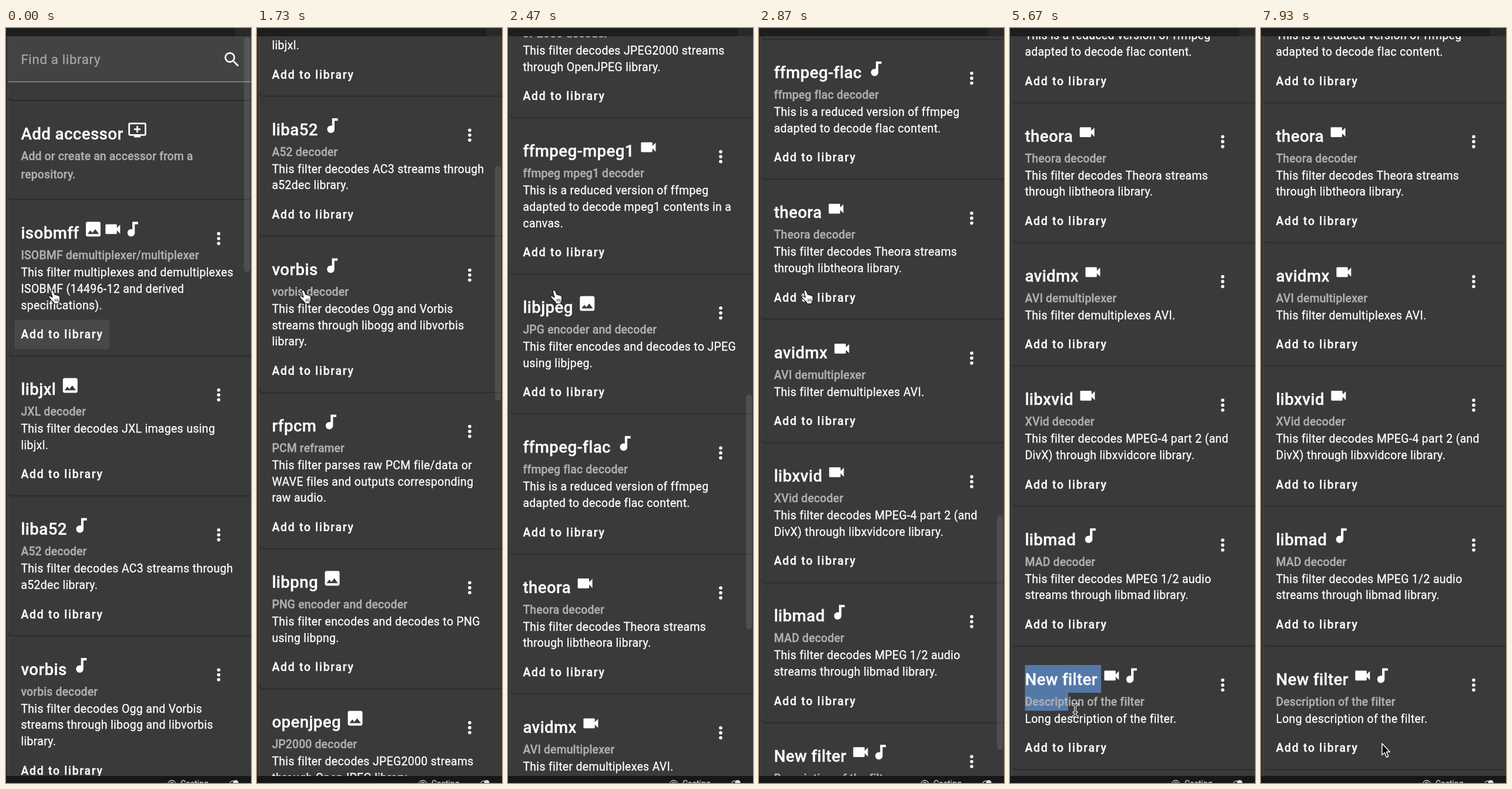
Animation of 417x1280 px, one loop 8 s. Source, as an HTML page:

```html
<!DOCTYPE html>
<html lang="en">
<head>
<meta charset="utf-8">
<title>Filter library</title>
<style>
html, body { margin: 0; width: 100%; height: 100%; overflow: hidden; background: #3a3a3a; }
svg { display: block; width: 100vw; height: 100vh; }
text { font-family: Roboto, "Liberation Sans", sans-serif; color: #fff; fill: currentColor; stroke: currentColor; stroke-width: .3px; white-space: pre; }
.title { font-size: 27.75px; font-weight: 500; letter-spacing: .0125em; }
.sub { font-size: 19.42px; font-weight: 500; letter-spacing: .00714em; color: #b0b0b0; }
.body { font-size: 19.42px; letter-spacing: .01786em; }
.button { font-size: 19.42px; font-weight: 500; letter-spacing: .0893em; }
.search { font-size: 22.2px; letter-spacing: .03125em; color: #a6a6a6; }
.status { font-size: 14px; color: #c4c4c4; }
</style>
</head>
<body>
<svg id="stage" viewBox="0 0 417 1280" preserveAspectRatio="none">
  <rect width="417" height="1280" fill="#3a3a3a"/>
  <g id="selection" fill="#5479a8"></g>
  <g id="list"></g>
  <rect id="thumb" x="405.5" width="9.5" height="397" rx="4.7" fill="#fff" fill-opacity=".1" stroke="#fff" stroke-opacity=".06"/>
  <rect y="14" width="3" height="1254" fill="#303030"/>
  <rect x="2.6" y="14" width="1.4" height="1254" fill="#484848"/>
  <rect width="417" height="14" fill="#1e1e1e"/>
  <rect x="390" width="27" height="14" fill="#292929"/>
  <rect y="1268" width="417" height="12" fill="#171717"/>
  <circle cx="282" cy="1282" r="6.5" fill="none" stroke="#c4c4c4" stroke-width="1.3"/>
  <circle cx="282" cy="1281.5" r="2.8" fill="none" stroke="#c4c4c4" stroke-width="1.3"/>
  <text class="status" x="297" y="1285.5">Casting</text>
  <circle cx="386" cy="1282" r="5.5" fill="none" stroke="#c4c4c4" stroke-width="1.3"/>
  <circle cx="391" cy="1279.5" r="4.6" fill="#dcdcdc"/>
  <g id="hand">
    <path d="M-1.8 1.7Q0-1.5 2.4 1L5.3 7.8Q7 6.8 8.1 8.5Q10 7.5 11 9.4Q13.2 8.8 13.5 11L13.8 15.8Q13.3 19 12 20.5V23H3.2V21L-1.6 16.2L-5.3 12Q-5.7 9.3-3 9.8L1 12.2Z" fill="#fff" stroke="#111" stroke-width="1.2" stroke-linejoin="round"/>
    <path d="M5.7 14.6V19.3M8.1 14.6V19.3M10.5 14.6V19.3" stroke="#222"/>
  </g>
  <g id="beam" fill="none" stroke-linecap="round">
    <path d="M-4-10Q0-10 0-7Q0-10 4-10M0-7V7M-4 10Q0 10 0 7Q0 10 4 10M-2.4 3H2.4" stroke="#fff" stroke-width="3.8"/>
    <path d="M-4-10Q0-10 0-7Q0-10 4-10M0-7V7M-4 10Q0 10 0 7Q0 10 4 10M-2.4 3H2.4" stroke="#181818" stroke-width="1.5"/>
  </g>
  <path id="arrow" d="M0 0V19.5L4.4 15.5L7.6 23.2L10.8 21.8L7.6 14.2H13.4Z" fill="#0a0a0a" stroke="#fff" stroke-width="1.5" stroke-linejoin="round"/>
</svg>
<script>
const $ = id => document.getElementById(id);
const SCALE = 1.3875, LEFT = 25.4, LINE = 20 * SCALE;
const STEP = 1000 / 15, LOOP = 8000;

const ICONS = {
  image: "M21 19V5c0-1.1-.9-2-2-2H5c-1.1 0-2 .9-2 2v14c0 1.1.9 2 2 2h14c1.1 0 2-.9 2-2zM8.5 13.5l2.5 3.01L14.5 12l4.5 6H5z",
  video: "M17 10.5V7c0-.55-.45-1-1-1H4c-.55 0-1 .45-1 1v10c0 .55.45 1 1 1h12c.55 0 1-.45 1-1v-3.5l4 4v-11z",
  note: "M12 3v9.28c-.47-.17-.97-.28-1.5-.28C8.01 12 6 14.01 6 16.5S8.01 21 10.5 21c2.31 0 4.2-1.75 4.45-4H15V6h4V3z",
  add: "M21 3H3c-1.1 0-2 .9-2 2v12c0 1.1.9 2 2 2h5v2h8v-2h5c1.1 0 2-.9 2-2V5c0-1.1-.9-2-2-2zm0 14H3V5h18zM11 15h2v-3h3v-2h-3V7h-2v3H8v2h3z",
  search: "M15.5 14h-.79l-.28-.27A6.47 6.47 0 0 0 16 9.5 6.5 6.5 0 1 0 9.5 16c1.61 0 3.09-.59 4.23-1.57l.27.28v.79l5 4.99L20.49 19zM9.5 14a4.5 4.5 0 1 1 0-9 4.5 4.5 0 0 1 0 9z"
};

// name | icons | subtitle | description lines
const FILTERS = [
  "isobmff|image video note|ISOBMF demultiplexer/multiplexer|This filter multiplexes and demultiplexes|ISOBMF (14496-12 and derived|specifications).",
  "libjxl|image|JXL decoder|This filter decodes JXL images using|libjxl.",
  "liba52|note|A52 decoder|This filter decodes AC3 streams through|a52dec library.",
  "vorbis|note|vorbis decoder|This filter decodes Ogg and Vorbis|streams through libogg and libvorbis|library.",
  "rfpcm|note|PCM reframer|This filter parses raw PCM file/data or|WAVE files and outputs corresponding|raw audio.",
  "libpng|image|PNG encoder and decoder|This filter encodes and decodes to PNG|using libpng.",
  "openjpeg|image|JP2000 decoder|This filter decodes JPEG2000 streams|through OpenJPEG library.",
  "ffmpeg-mpeg1|video|ffmpeg mpeg1 decoder|This is a reduced version of ffmpeg|adapted to decode mpeg1 contents in a|canvas.",
  "libjpeg|image|JPG encoder and decoder|This filter encodes and decodes to JPEG|using libjpeg.",
  "ffmpeg-flac|note|ffmpeg flac decoder|This is a reduced version of ffmpeg|adapted to decode flac content.",
  "theora|video|Theora decoder|This filter decodes Theora streams|through libtheora library.",
  "avidmx|video|AVI demultiplexer|This filter demultiplexes AVI.",
  "libxvid|video|XVid decoder|This filter decodes MPEG-4 part 2 (and|DivX) through libxvidcore library.",
  "libmad|note|MAD decoder|This filter decodes MPEG 1/2 audio|streams through libmad library.",
  "New filter|video note|Description of the filter|Long description of the filter."
];

function add(parent, tag, attrs, content) {
  const el = document.createElementNS("http://www.w3.org/2000/svg", tag);
  for (const key in attrs) el.setAttribute(key, attrs[key]);
  if (content) el.textContent = content;
  return parent.appendChild(el);
}

const list = $("list");
const label = (cls, y, content) => add(list, "text", { class: cls, x: LEFT, y }, content);
const icon = (name, x, y) => add(list, "path", {
  d: ICONS[name], fill: "#fff", "fill-rule": "evenodd",
  transform: `translate(${x} ${y}) scale(${SCALE})`
});

function edge(y) {
  const d = `M4 ${y - 6}q0 6 6 6H417`;
  add(list, "path", { d, fill: "none", stroke: "#000", "stroke-opacity": .07, "stroke-width": 4 });
  add(list, "path", { d, fill: "none", stroke: "#2c2c2c", "stroke-width": 1.4 });
}

function heading(top, name, icons) {
  const text = label("title", top + 66, name);
  const x = LEFT + text.getComputedTextLength() + 7.3;
  icons.split(" ").forEach((n, i) => icon(n, x + i * 24 * SCALE, top + 50 - 12 * SCALE));
}

function buildCard(top, [name, icons, sub, ...lines], focused) {
  const bottom = top + 131 * SCALE + lines.length * LINE;
  heading(top, name, icons);
  label("sub", top + 101, sub);
  lines.forEach((line, i) => label("body", top + 130 + i * LINE, line));
  if (focused) add(list, "rect", { x: 14.5, y: bottom - 61.5, width: 162, height: 50, rx: 5.5, fill: "#484848" });
  label("button", bottom - 30, "Add to library");
  for (const d of [-1, 0, 1]) add(list, "circle", { cx: 362, cy: top + 66 + d * 8.33, r: 2.8, fill: "#fff" });
  edge(bottom);
  return bottom;
}

function buildList() {
  add(list, "rect", { x: 4, y: 14, width: 413, height: 77, fill: "#434343" });
  add(list, "rect", { x: 4, y: 90.5, width: 413, height: 1.4, fill: "#929292" });
  label("search", 61, "Find a library");
  icon("search", 367.8, 36.8);
  edge(123);
  heading(123, "Add accessor", "add");
  label("sub", 224, "Add or create an accessor from a");
  label("sub", 254.5, "repository.");
  edge(291);
  FILTERS.reduce((top, row, i) => buildCard(top, row.split("|"), i === 0), 291);
}

// [step, offset]
const SCROLL = [[17, 0], [21, 300], [31, 1105.3], [37, 1883], [46, 2648]];
// [ms, x, y]
const POINTER = [
  [3666, 76, 496], [3733, 104, 820], [3800, 132, 1097], [3933, 132, 1097],
  [4400, 132, 1137], [4600, 132, 1139], [4933, 23, 1104], [5333, 23, 1104],
  [5667, 111, 1157], [6200, 407, 1178], [6400, 400, 1166], [6867, 268, 1183],
  [7133, 268, 1183], [7467, 206, 1213]
];

const clamp = (v, lo, hi) => Math.min(hi, Math.max(lo, v));

// Smooth curve through the scroll points, flat at both ends.
function scrollAt(step) {
  const last = SCROLL.length - 1;
  if (step <= SCROLL[0][0]) return 0;
  if (step >= SCROLL[last][0]) return SCROLL[last][1];
  const i = SCROLL.findIndex(p => p[0] > step) - 1;
  const slope = n => {
    if (n === 0 || n === last) return 0;
    const [a, b] = [SCROLL[n - 1], SCROLL[n + 1]];
    return (b[1] - a[1]) / (b[0] - a[0]);
  };
  const [s0, y0] = SCROLL[i], [s1, y1] = SCROLL[i + 1];
  const h = s1 - s0, u = (step - s0) / h, v = 1 - u;
  return y0 * v * v * (1 + 2 * u) + y1 * u * u * (3 - 2 * u)
    + h * u * v * (slope(i) * v - slope(i + 1) * u);
}

function pointerAt(t) {
  const i = POINTER.findIndex(p => p[0] > t);
  if (i < 0) return POINTER[POINTER.length - 1].slice(1);
  if (i === 0) return POINTER[0].slice(1);
  const a = POINTER[i - 1], b = POINTER[i];
  const u = (t - a[0]) / (b[0] - a[0]), e = u * u * (3 - 2 * u);
  return [a[1] + (b[1] - a[1]) * e, a[2] + (b[2] - a[2]) * e];
}

// Highlighted lines: top, height, right end
const ROWS = [[1080, 47, 155], [1127, 30.5, 229], [1157.5, 28, 284]];
const marks = ROWS.map(([y, height]) => add($("selection"), "rect", { x: LEFT, y, height, width: 0 }));

function drawSelection(t) {
  const active = t > 5390 && t < 7790;
  const [x, y] = pointerAt(Math.min(t, 6867));
  const row = y < 1127 ? 0 : y < 1160 ? 1 : 2;
  ROWS.forEach(([, , end], i) => {
    const right = i < row ? end : i > row ? LEFT : clamp(x - 12, LEFT, end);
    marks[i].setAttribute("width", active ? right - LEFT : 0);
  });
}

function drawPointer(t) {
  const kind = t < 3660 ? "hand" : t < 6860 ? "beam" : "arrow";
  const [x, y] = kind === "hand" ? [78, 444.5] : pointerAt(t);
  for (const id of ["hand", "beam", "arrow"]) $(id).style.display = id === kind ? "" : "none";
  $(kind).setAttribute("transform", `translate(${x} ${y})`);
}

function draw(time) {
  const step = Math.floor(time / STEP + .1), t = step * STEP;
  const scroll = scrollAt(step);
  list.setAttribute("transform", `translate(0 ${-scroll})`);
  $("thumb").setAttribute("y", 16.5 + scroll * .3215);
  $("thumb").setAttribute("opacity", t < 3660 ? 1 : clamp((3800 - t) / 400, 0, 1));
  drawSelection(t);
  drawPointer(t);
}

buildList();
const start = performance.now();
function loop() {
  draw((performance.now() - start) % LOOP);
  requestAnimationFrame(loop);
}
loop();
</script>
</body>
</html>
```
